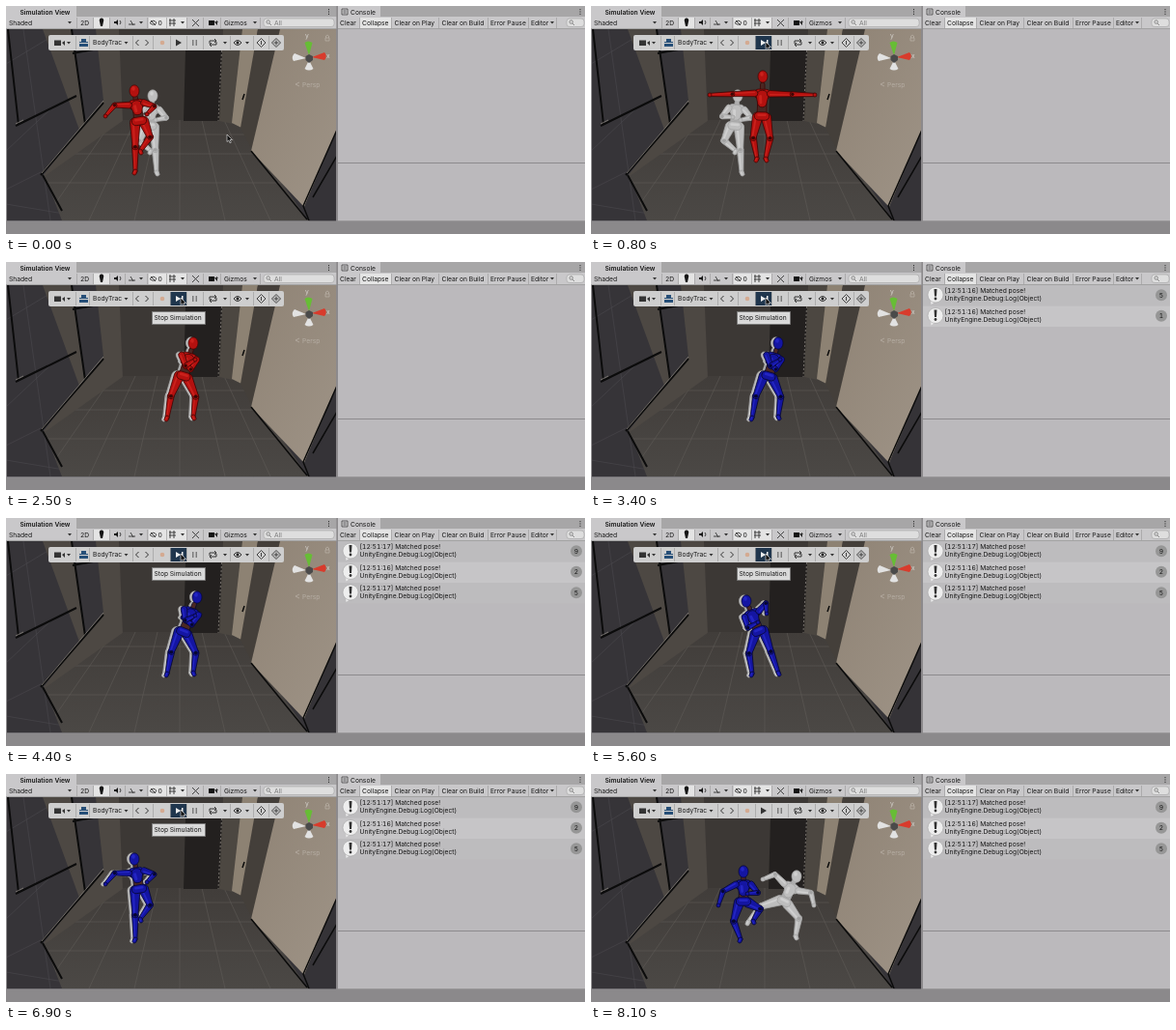
An HTML page that plays this animation: 600x236 px, repeating every 8200 ms.

```html
<!DOCTYPE html>
<html lang="en">
<head>
<meta charset="utf-8">
<title>Simulation view</title>
<style>
html, body { margin: 0; width: 100%; height: 100%; overflow: hidden; background: #8b898b; }
svg { display: block; width: 600px; height: 236px; font: 6.7px Inter, Roboto, sans-serif; font-variant-numeric: tabular-nums; fill: #151515; }
.ln { fill: none; stroke: #333; stroke-width: 1; }
.sep { fill: none; stroke: #a0a0a0; stroke-width: .7; }
.rail { fill: none; stroke: #0b0b0b; stroke-width: 2; }
.glow { fill: none; stroke: #97918a; stroke-width: .7; }
</style>
</head>
<body>
<svg viewBox="0 0 600 236">
  <defs>
    <clipPath id="view"><rect x="1" y="24" width="341" height="198.500"/></clipPath>
    <clipPath id="floor"><path d="M122 118H240L313 222H58L40 176Z"/></clipPath>
    <linearGradient id="floorFill" x2="0" y2="1"><stop stop-color="#413d3a"/><stop offset="1" stop-color="#4b4845"/></linearGradient>
    <linearGradient id="wallFill" x2="1" y2="1"><stop stop-color="#8f8375"/><stop offset="1" stop-color="#9e9386"/></linearGradient>
  </defs>
  <rect width="600" height="236" fill="#8b898b"/>

  <g clip-path="url(#view)">
    <rect y="24" width="343" height="199" fill="#363438"/>
    <path d="M0 60L60 24M0 150L48 105M0 190L40 170M18 24L46 222M0 205L60 215" class="ln" style="stroke:#4b494d;stroke-width:.6"/>
    <path d="M38 24H118L122 118L58 213L38 176L76 128Z" fill="#4d4843"/>
    <path d="M117 24H240V120H121Z" fill="#3c3835"/>
    <path d="M122 118H240L313 222H58L40 176Z" fill="url(#floorFill)"/>
    <path id="grid" clip-path="url(#floor)" class="ln" style="stroke:#625e5a;stroke-width:.5"/>
    <path d="M68 24H93L101 98L82 122Z" fill="#363438"/>
    <path d="M10 124L73 93M36 175L101 100M38 175L58 212M68 24L82 122M2 24L13 123M69 49L96 44" class="rail"/>
    <path d="M10 122L18 118M37 173L101 98" class="glow"/>
    <path d="M186 46H225L222 119H184Z" fill="#23201f"/>
    <path d="M225 24H246L235 122L221 119Z" fill="#4c4741"/>
    <path d="M223.500 46L220 119" class="glow" stroke-dasharray="2 2"/>
    <path d="M245 24H261L248 128L234 121Z" fill="#8d8273"/>
    <path d="M261 24H286L256 151L243 126Z" fill="#443f3a"/>
    <path d="M284 24H343V128L309 208L254 150Z" fill="url(#wallFill)"/>
    <path d="M343 128L309 208L314 223H343Z" fill="#353337"/>
    <path d="M343 128L308 207L314 222M343 155L318 198M254 150L312 221M247 91L245 97" class="rail" style="stroke-width:1.500"/>
    <g id="figures"></g>

    <path d="M314 51L309.500 38Q313 35 317.500 38Z" fill="#67bd35"/>
    <path d="M317 53L330 48Q333.500 52 330 56Z" fill="#d83b2c"/>
    <path d="M311 54L299 49Q295 53 298 57ZM314 56L309.500 65Q314 68 318.500 65Z" fill="#e2e2e2"/>
    <path d="M310.500 52L314 50L318 52V56L314 59L310.500 56Z" fill="#4a4a4a"/>
    <g fill="#d5d2ce"><text x="310" y="32.500">y</text><text x="332" y="54">x</text><text x="307" y="83.500" fill="#b6aea4">Persp</text></g>
    <path d="M304 79L300 81L304 83M331.500 33V31Q333 29 334.500 31V33M331 33H335V36H331Z" class="ln" style="stroke:#b6aea4;stroke-width:.8"/>

    <rect x="44" y="30" width="244" height="16" rx="2" fill="#cecece"/>
    <path d="M50 35.500H57V41H50ZM58 38L61 36V41Z" fill="#333"/>
    <path d="M76 39H85V42H76ZM78 34H83V37H85V38H76V37H78Z" fill="#274f78"/>
    <text x="90" y="40.300">BodyTrac</text>
    <path d="M137.500 35L134.500 38L137.500 41M144.500 35L147.500 38L144.500 41M211 39V36H217M218 37V40H212M216 34L218 36L216 38M213 38L211 40L213 42" class="ln"/>
    <circle cx="162" cy="38" r="2.300" fill="#d4aa91"/>
    <g id="play"></g>
    <path d="M236 38Q240 33 244 38Q240 43 236 38Z" class="ln"/><circle cx="240" cy="38" r="1.400"/>
    <path d="M264.500 33.500L269 38L264.500 42.500L260 38ZM264.500 36V40M280 33.500L284.500 38L280 42.500L275.500 38ZM277.500 38H282.500M280 35.500V40.500" class="ln" style="stroke-width:.9"/>
  </g>

  <path d="M0 0H342.500V11H0ZM344 0H600V11H344Z" fill="#a7a6a7"/>
  <path d="M0 0H73V11H0ZM344 0H388V11H344ZM0 11H342.500V23.500H0ZM344 11H600V23.500H344Z" fill="#c9c8ca"/>
  <path d="M0 23.500H342.500M344 23.500H600" class="sep"/>
  <text x="14.500" y="8.500" font-weight="600">Simulation View</text>
  <text x="357" y="8.500">Console</text>
  <path d="M348 3H354V9H348ZM349.500 5H352.500M349.500 7H352.500" class="ln" style="stroke-width:.7"/>
  <path d="M334.500 3V9M595 3V9" class="ln" stroke-dasharray="1.200 1.200"/>
  <path d="M91 12H107V23H91ZM148 12H187V23H148ZM367 12H399V23H367Z" fill="#e4e4e4"/>
  <path d="M97 16A2.300 2.300 0 1 1 101 16L100 21H98ZM112 16H114L116 14V20L114 18H112ZM210 15H216V20H210ZM216.500 17L219 15V20Z"/>
  <path d="M118 15Q120 17 118 19M127 19H134M129 15L132 20M150 15L155 20M149 17.500Q153 13 156 17.500Q153 21 149 17.500M169 15H176M169 18H176M170 13V21M174 13V21M193 14L200 21M200 14L193 21" class="ln" style="stroke-width:.9"/>
  <g id="search"></g>
  <g id="labels"></g>

  <rect x="344" y="24" width="256" height="198.500" fill="#bbb9bc"/>
  <g id="rows"></g>
  <path d="M344 162.500H600M0 223H600M343.200 0V223" class="ln" style="stroke:#8d8b8d"/>
  <path id="seps" class="sep"/>
  <path id="carets" fill="#333"/>
  <g id="top"></g>
</svg>
<script>
const LOOP = 8200, STEP = 100;
const START = 800, FOLLOW = 1900, MATCH = 2900, PART = 6900, STOP = 8000;
const $ = id => document.getElementById(id);
const mix = (a, b, k) => a + (b - a) * k;
const ease = k => k * k * (3 - 2 * k);
const clamp = (v, lo, hi) => Math.min(hi, Math.max(lo, v));

// A pose is head, hip, left and right hand, left and right foot; the other joints follow by rule
const run = [[133, 88], [138, 119], [103, 114], [146, 112], [134, 171], [139, 150]];
const beside = [[152, 93], [149, 124], [147, 115], [155, 118], [150, 150], [156, 172]];
const tPose = [[178, 73], [177, 114], [123, 92], [232, 92], [172, 158], [181, 158]];
const jog = [[215, 94], [214, 124], [207, 112], [235, 122], [211, 165], [216, 149]];
const crossed = [[194, 84], [184, 118], [196, 101], [183, 103], [167, 161], [194, 160]];
const leaning = [[198, 82], ...crossed.slice(1)];
const turned = [[161, 86], [174, 117], [173, 108], [182, 99], ...crossed.slice(4)];
const lag = [[158, 101], [158, 132], [132, 136], [162, 124], [155, 171], [168, 152]];
const lead = [[213, 106], [200, 132], [178, 109], [231, 136], [163, 153], [212, 168]];

const bodyKeys = [[0, beside], [START, beside], [1100, jog], [1500, jog], [2500, crossed], [3400, crossed],
  [4400, leaning], [5600, turned], [PART, run], [8100, lead]];
const robotKeys = [[PART, run], [8100, lag]];

function poseAt(keys, t) {
  const i = keys.findIndex(k => k[0] > t);
  if (i < 0) return keys.at(-1)[1];
  if (!i) return keys[0][1];
  const [t0, a] = keys[i - 1], [t1, b] = keys[i];
  const k = ease((t - t0) / (t1 - t0));
  return a.map((p, j) => p.map((v, n) => mix(v, b[j][n], k)));
}

// Elbow or knee: bends outward as the limb gets shorter than twice the bone length
function bend(a, b, bone, side, amount) {
  const dx = b[0] - a[0], dy = b[1] - a[1], d = Math.hypot(dx, dy) || 1;
  const h = side * amount * Math.sqrt(Math.max(0, bone * bone - d * d / 4)) / d;
  return [(a[0] + b[0]) / 2 + dy * h, (a[1] + b[1]) / 2 - dx * h];
}

// Tapered, rounded segment with a soft highlight
function limb(a, b, r, s, { base, edge, shine }) {
  const dx = b[0] - a[0], dy = b[1] - a[1], d = Math.hypot(dx, dy) || 1;
  const at = (p, q) => `${(p[0] - dy / d * q).toFixed(1)} ${(p[1] + dx / d * q).toFixed(1)}`;
  return `<path d="M${at(a, r)}A${r} ${r} 0 0 1 ${at(a, -r)}L${at(b, -s)}A${s} ${s} 0 0 1 ${at(b, s)}Z" fill="${base}" stroke="${edge}" stroke-width=".8"/>` +
    `<path d="M${at(a, r * .3)}L${at(b, s * .3)}" stroke="${shine}" stroke-width="${s * .6}" stroke-linecap="round"/>`;
}

const oval = ([x, y], rx, ry, fill, edge) => `<ellipse cx="${x}" cy="${y}" rx="${rx}" ry="${ry}" fill="${fill}" stroke="${edge}" stroke-width=".7"/>`;

function figure([head, hip, ...ends], skin) {
  const dx = hip[0] - head[0], dy = hip[1] - head[1], d = Math.hypot(dx, dy);
  const spot = (down, side) => [head[0] + dx * down + dy / d * side, head[1] + dy * down - dx / d * side];
  const dark = { base: skin.waist, edge: skin.edge, shine: skin.waist };
  const arm = (hand, side) => {
    const s = spot(.43, side * 8), e = bend(s, hand, 17, side, .6);
    return limb(s, e, 3.3, 2.4, skin) + limb(e, hand, 2.6, 1.6, skin) + oval(e, 1.4, 1.4, skin.edge, skin.edge) + oval(hand, 2, 2, skin.base, skin.edge);
  };
  const leg = (foot, side) => {
    const p = spot(1.03, side * 4.5), k = bend(p, foot, 23, side, .5);
    return limb(k, foot, 3.4, 1.9, skin) + limb(foot, [foot[0] + side, foot[1] + 2], 2, 2, skin) +
      limb(p, k, 5.2, 3, skin) + oval(k, 1.8, 1.5, skin.edge, skin.edge);
  };
  return leg(ends[3], 1) + leg(ends[2], -1) + limb(spot(.6, 0), spot(.95, 0), 4.6, 5, dark) +
    limb(spot(1, 3.5), spot(1, -3.5), 4.2, 4.2, skin) + limb(spot(.2, 0), spot(.4, 0), 2.2, 2.4, dark) +
    limb(spot(.44, 4), spot(.44, -4), 4.8, 4.8, skin) + limb(spot(.5, 0), spot(.66, 0), 6.3, 4.8, skin) +
    arm(ends[1], 1) + arm(ends[0], -1) + oval(head, 5, 6.2, skin.base, skin.edge) +
    oval([head[0] - 1, head[1] - 2.5], 1.8, 2.2, skin.shine, 'none');
}

const white = { base: '#bebebe', edge: '#a2a2a2', shine: '#d0d0d0', waist: '#b0b0b0' };
const red = { base: '#b4110f', edge: '#3d0605', shine: '#cb211c', waist: '#4b2722' };
const blue = { base: '#1415a2', edge: '#06072e', shine: '#2325c4', waist: '#4c2822' };

function figures(t) {
  const body = poseAt(bodyKeys, t);
  const follows = t >= FOLLOW && t <= PART;
  const robot = t < START ? run : t < FOLLOW ? tPose : follows ? body : poseAt(robotKeys, t);
  return `<g transform="translate(${follows ? -2.5 : 0})">${figure(body, white)}</g>` + figure(robot, t < MATCH ? red : blue);
}

function playButtons(on) {
  const pause = '<path d="M193 35H194.500V41H193ZM196.500 35H198V41H196.500Z" fill="#7c7c7c"/>';
  return pause + (on
    ? '<rect x="170" y="31" width="17" height="14" fill="#20364d"/><path d="M176 35L181 38L176 41ZM182 35H183.500V41H182Z" fill="#eee"/>'
    : '<path d="M176 34.500L182 38L176 41.500Z" fill="#333"/>');
}

function row(i, sec, count) {
  return `<g transform="translate(344 ${24 + 21.5 * i})">
    <rect width="256" height="21.500" fill="${i % 2 ? '#c6c5c7' : '#bdbcbe'}"/>
    <path d="M8 14L8.500 20L14 16Z" fill="#eee"/><circle cx="13" cy="10" r="8" fill="#eee" stroke="#999" stroke-width=".5"/>
    <path d="M11.500 4H14.500L14 11.500H12Z" fill="#333"/><circle cx="13" cy="14" r="1.400" fill="#333"/>
    <text x="22.500" y="8">[12:51:${sec}] Matched pose!</text><text x="22.500" y="16.300">UnityEngine.Debug:Log(Object)</text>
    <circle cx="247" cy="10.300" r="6" fill="#969696"/><text x="247" y="12.800" text-anchor="middle">${count}</text></g>`;
}

// One match is logged per step; equal messages collapse into counted rows
function log(t) {
  const n = clamp((t - MATCH) / STEP + 1, 0, 16);
  const counts = [Math.min(n, 5) + Math.max(n - 12, 0), clamp(n - 5, 0, 2), clamp(n - 7, 0, 5)];
  const secs = [n > 12 ? 17 : 16, 16, 17];
  return counts.map((c, i) => c ? row(i, secs[i], c) : '').join('');
}

function overlay(t) {
  if (t >= STOP) return '';
  const k = ease(clamp(t / 700, 0, 1));
  const tip = t < 1000 ? '' : '<rect x="151.500" y="51.500" width="55" height="13" fill="#d9d9d9" stroke="#777" stroke-width=".8"/><text x="153.500" y="60.300">Stop Simulation</text>';
  return tip + `<path transform="translate(${mix(229, 181, k)} ${mix(133, 37, k)})" d="M0 0V7.500L1.800 6L3 8.800L4.300 8.200L3.100 5.500H5.500Z" fill="#111" stroke="#eee" stroke-width=".6"/>`;
}

const labels = { Shaded: 3, '2D': 77, 0: 157.5, Gizmos: 226, Clear: 346, Collapse: 369, 'Clear on Play': 402.5,
  'Clear on Build': 451.5, 'Error Pause': 502, Editor: 544 };
$('labels').innerHTML = Object.entries(labels).map(([s, x]) => `<text x="${x}" y="19.500">${s}</text>`).join('') +
  '<text x="278" y="19.500" fill="#777">All</text>';

$('search').innerHTML = [[267, 73], [581, 18]].map(([x, w]) =>
  `<rect x="${x}" y="13" width="${w}" height="8.500" rx="3" fill="#dedede" stroke="#999" stroke-width=".5"/>
   <path d="M${x + 3} 16.500a1.700 1.700 0 1 1 3.400 0a1.700 1.700 0 1 1 -3.400 0M${x + 6} 18l2 2" class="ln" style="stroke:#666;stroke-width:.7"/>`).join('');

const ticks = (y, h, xs) => xs.map(x => `M${x + .5} ${y}v${h}`).join('');
$('seps').setAttribute('d', ticks(12, 11, [73, 90, 107, 123, 146, 166, 187, 204, 222, 263, 366, 399, 448, 499, 541, 570]) +
  ticks(31, 14, [72, 86, 131, 152, 170, 187, 204, 232, 256, 272]));
const carets = (y, xs) => xs.map(x => `M${x - 2} ${y - 1}h4l-2 2.500Z`).join('');
$('carets').setAttribute('d', carets(17, [66, 140, 183, 218, 258, 566]) + carets(38, [65, 124.5, 227, 250]));

let lines = 'M0 133H343M0 153H343M0 183H343';
for (let i = -5; i <= 5; i++) lines += `M${180 + i * 23} 118L${180 + i * 47} 222`;
$('grid').setAttribute('d', lines);

const begin = performance.now();
let shown = -1;
function draw() {
  const t = Math.floor((performance.now() - begin) % LOOP / STEP) * STEP;
  if (t !== shown) {
    shown = t;
    $('figures').innerHTML = figures(t);
    $('play').innerHTML = playButtons(t >= START && t < STOP);
    $('rows').innerHTML = log(t);
    $('top').innerHTML = overlay(t);
  }
  requestAnimationFrame(draw);
}
draw();
</script>
</body>
</html>
```
